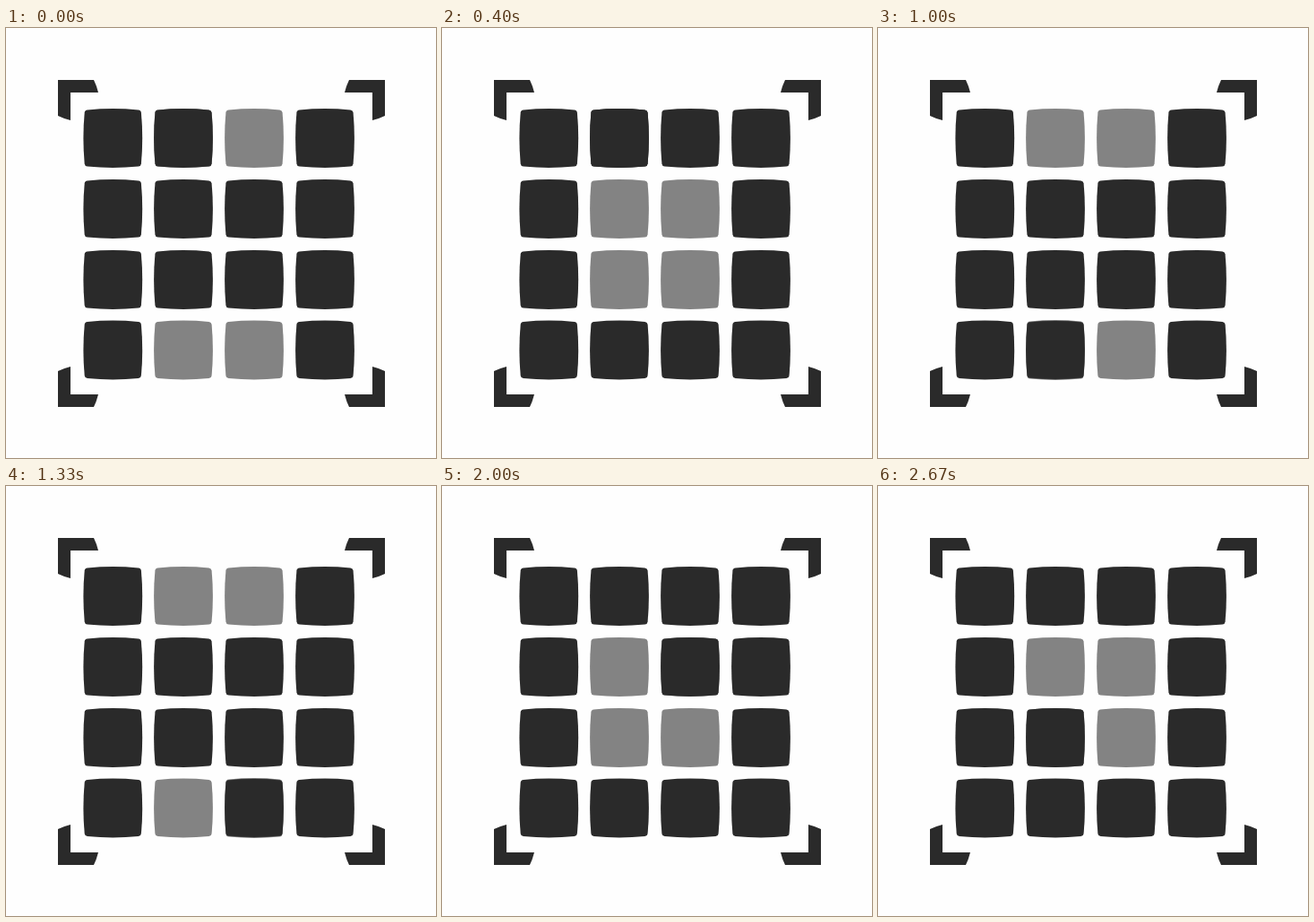
An HTML page for the animation above (2990 ms loop, 480 px wide and 480 px high).

```html
<!DOCTYPE html>
<html lang="en">
<head>
<meta charset="utf-8">
<title>Grid loader</title>
<style>
  html, body { margin: 0; width: 100%; height: 100%; overflow: hidden; background: #fefefe; }
  svg { display: block; width: 480px; height: 480px; fill: #2a2a2a; }
  .outer, .inner, .gap { animation: 2990ms step-end infinite; }
  .outer { animation-name: outer; }
  .inner { animation-name: inner; }
  .gap { animation-name: gap; }

  @keyframes outer {
    0%, 22.408% { fill: #838383; }
    11.037%, 55.853%, 100% { fill: #2a2a2a; }
  }
  @keyframes inner {
    0%, 22.408% { fill: #2a2a2a; }
    11.037%, 55.853%, 100% { fill: #838383; }
  }
  /* The one dark cell that moves around the lit group */
  @keyframes gap {
    0% { transform: translate(198px, 123px); }
    22.408% { transform: translate(277px, 123px); }
    33.445% { transform: translate(198px, 359.5px); }
    44.482% { transform: translate(277px, 359.5px); }
    55.853% { transform: translate(198px, 202px); }
    66.89% { transform: translate(277px, 202px); }
    77.926% { transform: translate(277px, 281px); }
    89.298%, 100% { transform: translate(198px, 281px); }
  }
</style>
</head>
<body>
<svg viewBox="0 0 480 480">
  <defs>
    <path id="cell" d="M-31.6-28.5Q-31.3-31.3-28.5-31.6Q0-34.2 28.5-31.6Q31.3-31.3 31.6-28.5Q34.2 0 31.6 28.5Q31.3 31.3 28.5 31.6Q0 34.2-28.5 31.6Q-31.3 31.3-31.6 28.5Q-34.2 0-31.6-28.5Z"/>
    <path id="corner" d="M58 58H98Q101 64 103 72H72V103Q64 101 58 98Z"/>
    <g id="column">
      <use href="#cell" y="123"/>
      <use href="#cell" y="202"/>
      <use href="#cell" y="281"/>
      <use href="#cell" y="359.5"/>
    </g>
    <g id="pair">
      <use href="#cell" x="198"/>
      <use href="#cell" x="277"/>
    </g>
  </defs>

  <use href="#corner"/>
  <use href="#corner" transform="translate(481 0) scale(-1 1)"/>
  <use href="#corner" transform="translate(0 481) scale(1 -1)"/>
  <use href="#corner" transform="translate(481 481) scale(-1 -1)"/>

  <use href="#column" x="119.3"/>
  <use href="#column" x="356"/>

  <g class="outer">
    <use href="#pair" y="123"/>
    <use href="#pair" y="359.5"/>
  </g>
  <g class="inner">
    <use href="#pair" y="202"/>
    <use href="#pair" y="281"/>
  </g>
  <g class="gap"><use href="#cell"/></g>
</svg>
</body>
</html>
```
